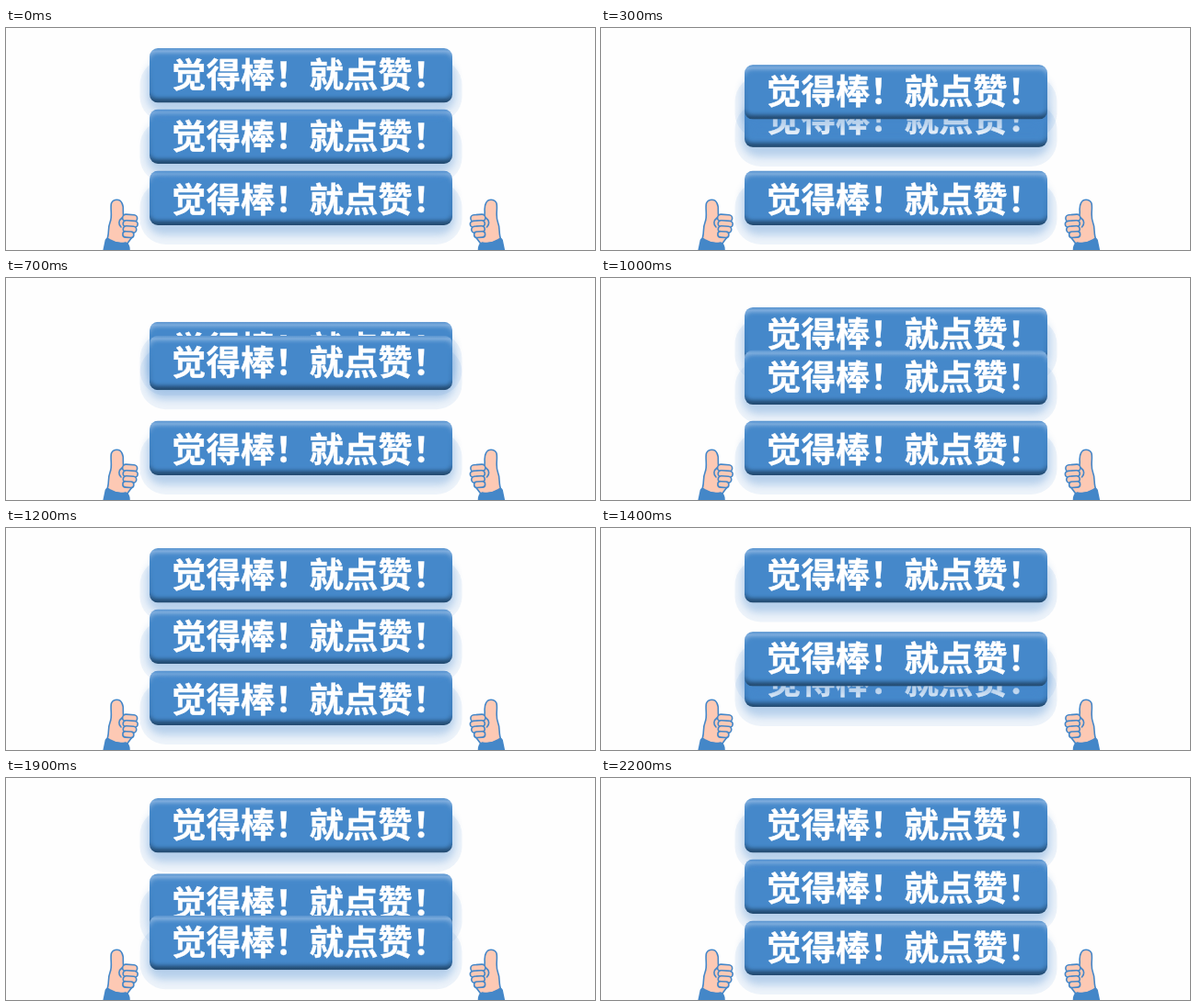
Recreate the animation shown at these times as an HTML page. Size 640x242 px, loop 2.3 s.

```html
<!DOCTYPE html>
<html lang="zh-CN">
<head>
<meta charset="utf-8">
<title>点赞</title>
<style>
  html, body { margin: 0; width: 100%; height: 100%; overflow: hidden; background: #fefefe; }
  svg { display: block; width: 640px; height: 242px; }
  text { font: bold 37.4px "Noto Sans CJK SC", "Noto Sans CJK", sans-serif; fill: #fff; stroke: #fff; stroke-width: .4px; }
</style>
</head>
<body>
<svg viewBox="0 0 640 242">
  <defs>
    <linearGradient id="bevel" x1="0" y1="0" x2="0" y2="1">
      <stop offset="0" stop-color="#5592cf"/>
      <stop offset=".06" stop-color="#82afde"/>
      <stop offset=".25" stop-color="#4487c8"/>
      <stop offset=".8" stop-color="#3a78b5"/>
      <stop offset=".95" stop-color="#265079"/>
      <stop offset="1" stop-color="#244b70"/>
    </linearGradient>
    <filter id="soft" x="-10%" y="-40%" width="120%" height="180%"><feGaussianBlur stdDeviation="2"/></filter>
    <filter id="glow" x="-10%" y="-40%" width="120%" height="180%"><feGaussianBlur stdDeviation="4.5"/></filter>
    <clipPath id="face"><rect x="156" width="329" height="59.5" rx="9"/></clipPath>
    <g id="button">
      <rect x="145.5" y="12" width="350" height="68.500" rx="28" fill="#4587d0" opacity=".09"/>
      <rect x="153" y="12" width="335" height="58" rx="18" fill="#4587cc" opacity=".32" filter="url(#glow)"/>
      <g clip-path="url(#face)">
        <rect x="156" width="329" height="59.5" fill="url(#bevel)"/>
        <rect x="158" y="6" width="325" height="48" rx="6" fill="#4488ca" filter="url(#soft)"/>
      </g>
    </g>
    <g id="thumb" stroke="#4587c8" stroke-width="1.6" stroke-linejoin="round" stroke-linecap="round" fill="#fdc9b4">
      <path d="M109 232C113 225 110 219 113 212C116 205 113 197 114.500 191C117 186 124 186 126 191C129 196 126 201 128 206L137 206L137 228L131 236Z"/>
      <g transform="rotate(4 135 216)">
        <rect x="126" y="203.500" width="16" height="7.500" rx="3.700"/>
        <rect x="127" y="210" width="16" height="7" rx="3.500"/>
        <rect x="127.500" y="216" width="14.500" height="7" rx="3.500"/>
        <rect x="127.500" y="222" width="12" height="6.500" rx="3.200"/>
      </g>
      <path d="M126 207C122 210 122 214 125 217" fill="none"/>
      <path d="M106 243L108.500 231Q110 228 113 231Q121 236 130 234Q134 235 134 243Z" fill="#4487c8"/>
    </g>
  </defs>
  <rect width="640" height="242" fill="#fefefe"/>
  <use href="#thumb"/>
  <use href="#thumb" transform="translate(647.5) scale(-1 1)"/>
  <g id="stack"></g>
</svg>
<script>
const LOOP = 2300, STEP = 100, SWAP = 1200, END = 2200;
const TOP = 22, MIDDLE = 88.5, BOTTOM = 155.5;
const SVG = "http://www.w3.org/2000/svg";
const stack = document.getElementById("stack");

function add(parent, tag, attrs) {
  const el = document.createElementNS(SVG, tag);
  for (const key in attrs) el.setAttribute(key, attrs[key]);
  return parent.appendChild(el);
}

function makeButton(baseline) {
  const g = add(stack, "g", {});
  add(g, "use", { href: "#button" });
  add(g, "text", { x: 180, y: baseline }).textContent = "觉得棒！就点赞！";
  return g;
}

// Back to front: the falling button covers the two rising ones.
const lower = makeButton(45.5), middle = makeButton(43), falling = makeButton(43);

const nearLinear = p => p + .12 * p * (1 - p);
const easeOut = p => 1 - (1 - p) ** 2.05;
const quickStart = p => p ** .75;

function glide(t, start, end, from, to, ease) {
  const p = Math.min(1, Math.max(0, (t - start) / (end - start)));
  return from + (to - from) * ease(p);
}

function place(g, y) {
  g.setAttribute("transform", `translate(0 ${y.toFixed(2)})`);
}

function draw(time) {
  const t = Math.floor(time % LOOP / STEP) * STEP;
  place(falling, t < SWAP ? glide(t, 0, SWAP, TOP, MIDDLE, nearLinear)
                          : glide(t, SWAP, END, MIDDLE, BOTTOM, easeOut));
  place(middle, glide(t, 0, SWAP, MIDDLE, TOP, nearLinear));
  place(lower, glide(t, SWAP, END, BOTTOM, MIDDLE, quickStart));
}

const begin = performance.now();
function tick() {
  draw(performance.now() - begin);
  requestAnimationFrame(tick);
}
tick();
</script>
</body>
</html>
```
